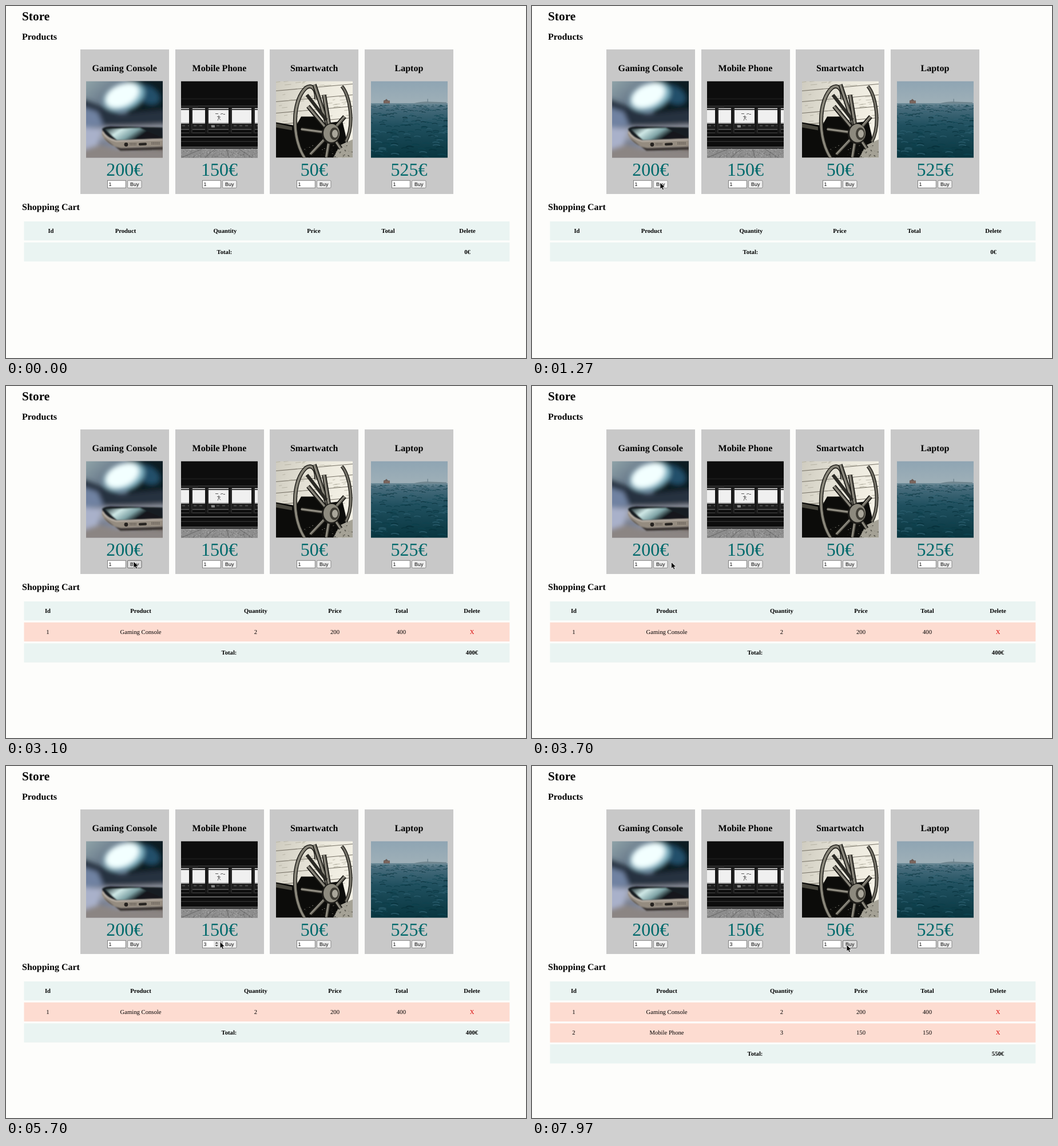
An HTML page for the animation above (8000 ms loop, 909 px wide and 616 px high).

```html
<!DOCTYPE html>
<html lang="en">
<head>
<meta charset="utf-8">
<title>Store</title>
<style>
html, body { margin: 0; width: 100%; height: 100%; overflow: hidden; background: #fdfdfb; }
#stage { display: block; width: 909px; height: 616px; }
text { font-family: "Liberation Serif", "Times New Roman", serif; text-rendering: geometricPrecision; }
.h1 { font-size: 21.33px; font-weight: bold; }
.h2 { font-size: 16px; font-weight: bold; }
.mid { text-anchor: middle; }
.price { font-size: 32px; fill: #006a6c; }
.ui { font-family: "Liberation Sans", Arial, sans-serif; font-size: 8.9px; }
.cell { font-size: 10.67px; text-anchor: middle; }
.head { font-weight: bold; }
.btn rect { fill: #efefef; stroke: #767676; stroke-width: .8; }
.btn.over rect { fill: #dedede; stroke: #4a4a4a; }
.btn.down rect { fill: #f5f5f5; stroke: #8d8d8d; }
</style>
</head>
<body>
<svg id="stage" viewBox="0 0 909 616">
  <defs>
    <filter id="b1" x="-30%" y="-30%" width="160%" height="160%"><feGaussianBlur stdDeviation=".8"/></filter>
    <filter id="b4" x="-60%" y="-60%" width="220%" height="220%"><feGaussianBlur stdDeviation="4.5"/></filter>
    <linearGradient id="desk" x2=".9" y2="1">
      <stop stop-color="#8fa3a8"/><stop offset=".4" stop-color="#53627a"/>
      <stop offset=".7" stop-color="#8d94a8"/><stop offset="1" stop-color="#6f6862"/>
    </linearGradient>
    <linearGradient id="glass" x2="1" y2=".3">
      <stop stop-color="#1c2a30"/><stop offset=".3" stop-color="#cfe8e6"/>
      <stop offset=".55" stop-color="#7fa3a6"/><stop offset=".75" stop-color="#12191d"/>
    </linearGradient>
    <linearGradient id="sky" x2="0" y2="1">
      <stop stop-color="#8fa5b3"/><stop offset="1" stop-color="#9fb0b8"/>
    </linearGradient>
    <linearGradient id="sea" x2="0" y2="1">
      <stop stop-color="#6f8c99"/><stop offset=".1" stop-color="#466b7b"/>
      <stop offset=".4" stop-color="#20505f"/><stop offset="1" stop-color="#07353f"/>
    </linearGradient>
    <linearGradient id="wall" x2="1" y2=".3">
      <stop stop-color="#cfccc0"/><stop offset=".6" stop-color="#ece9dd"/><stop offset="1" stop-color="#f4f1e6"/>
    </linearGradient>
  </defs>
  <text class="h1" x="28" y="25">Store</text>
  <text class="h2" x="28" y="59">Products</text>
  <g id="cards"></g>
  <text class="h2" x="28" y="357">Shopping Cart</text>
  <g id="cart"></g>
  <path id="cursor" d="M0 0V11.5L2.6 9.1L4.4 13.1L6.5 12.2L4.8 8.3H8.4Z" fill="#000" stroke="#fff" stroke-width=".8"/>
</svg>
<script>
const LOOP = 8000;
const $ = id => document.getElementById(id);
const products = [["Gaming Console", 200], ["Mobile Phone", 150], ["Smartwatch", 50], ["Laptop", 525]];
const cardX = i => 129.8 + 165.75 * i;

// Moments at which the state changes
const BUY_CONSOLE = 1350, BUY_AGAIN = 2350, STEP_UP = [4900, 5250], BUY_PHONE = 6250;
const PRESS = 120;

// Pointer stops: time, x, y
const stops = [[500, 300, 420], [1000, 224, 309], [2200, 224, 309], [2700, 223, 307], [3500, 223, 307],
  [4350, 368, 315], [4750, 367, 309], [5500, 367, 309], [6000, 387, 305], [6900, 387, 305], [7700, 550, 313]];

const rect = (x, y, w, h, fill, extra = "") =>
  `<rect x="${x}" y="${y}" width="${w}" height="${h}" fill="${fill}" ${extra}/>`;
const text = (cls, x, y, s, extra = "") => `<text class="${cls}" x="${x}" y="${y}" ${extra}>${s}</text>`;
const path = (d, fill, stroke = "none", width = 1, extra = "") =>
  `<path d="${d}" fill="${fill}" stroke="${stroke}" stroke-width="${width}" ${extra}/>`;
const repeat = (n, f) => Array.from({ length: n }, (_, i) => f(i)).join("");

function random(seed) {
  return () => (seed = (seed * 16807) % 2147483647) / 2147483647;
}

function phonePhoto() {
  return rect(0, 0, 134, 134, "url(#desk)") +
    `<g filter="url(#b4)">` +
    rect(72, -10, 80, 90, "#0f1a24") +
    path("M-10 30L30 45L60 58L140 50V82L-10 76Z", "#28333f") +
    path("M-10 44L20 54L30 78L-10 82Z", "#6f82a2") +
    `<ellipse cx="108" cy="24" rx="22" ry="14" fill="#24506b" transform="rotate(30 108 24)"/>` +
    `<ellipse cx="66" cy="27" rx="37" ry="23" fill="#7fb4c4" transform="rotate(-20 66 27)"/>` +
    `<ellipse cx="63" cy="25" rx="31" ry="19" fill="#f2ffff" transform="rotate(-25 63 25)"/>` +
    path("M-10 82L140 76V90L-10 110Z", "#9599a4") +
    path("M-10 100L50 118L140 120V145H-10Z", "#8b8583") +
    path("M-10 80L28 84L20 112L-10 122Z", "#a9b1ca") + "</g>" +
    `<g filter="url(#b1)">` +
    path("M28 84Q30 80 42 79L134 81V104L52 105Q32 98 28 84Z", "#161d21") +
    path("M33 84L94 82L134 99V102L54 103Z", "url(#glass)") +
    path("M28 86Q34 99 52 104L134 101V114L56 117Q32 108 28 93Z", "#958c80") +
    path("M29 89Q36 101 53 105L134 102", "none", "#d4cac0", 1.5) +
    path("M31 99Q44 115 62 117L134 115V120L60 122Z", "#3d3735") + "</g>" +
    `<circle cx="70" cy="111" r="3.4" fill="#25221f"/>` +
    rect(92, 108, 14, 4.5, "#282522", 'rx="2" transform="rotate(-3 99 110)"') +
    repeat(10, i => `<circle cx="${77 + (i % 5) * 2.5}" cy="${109 + (i > 4) * 2.5}" r=".7" fill="#3b3531"/>`) +
    repeat(12, i => `<circle cx="${115 + (i % 6) * 2.6}" cy="${107.5 + (i > 5) * 2.5}" r=".7" fill="#3b3531"/>`);
}

function stationPhoto() {
  const r = random(7);
  return rect(0, 0, 134, 134, "#0d0d0d") +
    rect(0, 30, 134, 2, "#1b1b1b") + rect(0, 43, 134, 1, "#555") +
    rect(0, 47, 134, 2, "#d8d8d8") + rect(0, 50.5, 134, 22, "#f0f0f0") +
    rect(0, 72.5, 134, 2, "#aaa") + rect(0, 74.5, 134, 11, "#1e1e1e") +
    repeat(14, i => rect(2 + i * 10, 77, 5, 2, "#4c4c4c")) +
    rect(0, 84, 134, 1, "#777") + rect(0, 90, 134, 1, "#555") +
    rect(0, 97, 134, 1.2, "#999") + rect(0, 105, 134, 1, "#444") +
    rect(0, 115, 134, 1.2, "#888") + rect(0, 118, 134, 16, "#8d8d8d") +
    repeat(230, () => rect((r() * 134).toFixed(1), (118 + r() * 16).toFixed(1), 1.6, .8, r() < .5 ? "#b5b5b5" : "#666")) +
    path("M0 134L38 118M42 134L60 118M84 134L80 118M125 134L100 118", "none", "#666") +
    path("M66 60v4l-2 5m2-5l3 4m-6-6l6 1M60 57h5M69 58l2-1h2l1 1h3", "none", "#333", .8) +
    rect(53, 77, 6, 4, "#888") +
    [14, 42, 83, 123].map(x => rect(x, 45, 6, 47, "#181818") + rect(x + 4.5, 47, .8, 44, "#444")).join("") +
    rect(0, 45, 134, 2, "#161616") + rect(0, 43, 30, 4, "#262626");
}

function wheelPhoto() {
  const r = random(23);
  const spokes = [[67, 6], [84, 24], [56, 44], [44, 84], [60, 128], [88, 133], [113, 118], [120, 62]];
  const rim = "M50 134C27 100 28 34 52 12C62 4 72 14 70 32", back = "M115 9C129 24 138 75 122 106";
  return rect(0, 0, 134, 134, "url(#wall)") +
    [17, 36, 56, 76].map(y => path(`M0 ${y}L134 ${y - 12}`, "none", "#777267", 1.1)).join("") +
    repeat(60, () => {
      const x = r() * 125, y = r() * 76;
      return path(`M${x.toFixed(1)} ${y.toFixed(1)}l${(4 + r() * 9).toFixed(1)} -1`, "none", "#aaa697", .7);
    }) +
    path("M0 72L35 78L44 62L66 62L84 74L116 70L124 104L108 134H0Z", "#0c0c0a") +
    path("M0 74L28 80V86L0 81Z", "#4a483f") +
    path("M112 112L134 102V134H100Z", "#a5a296") +
    repeat(60, () => rect((48 + r() * 86).toFixed(1), (112 + r() * 22).toFixed(1), 2, .8, r() < .5 ? "#8b887c" : "#24231e")) +
    path(rim, "none", "#1d1c18", 7) + path(rim, "none", "#8a877b", 4) +
    path(back, "none", "#24231e", 6) + path(back, "none", "#77746a", 3) +
    spokes.map(([x, y]) => path(`M95 91L${x} ${y}`, "none", "#1a1915", 7.5) +
      path(`M95 91L${x} ${y}`, "none", "#77746a", 4) + path(`M94 90L${x - 1} ${y}`, "none", "#b5b2a5", .9)).join("") +
    path("M54 24L88 68", "none", "#2b2a25", 6) +
    `<ellipse cx="96" cy="92" rx="16" ry="18" fill="#1f1e1a"/>` +
    `<ellipse cx="97" cy="91" rx="14" ry="16" fill="#8d8a7e"/>` +
    `<ellipse cx="102" cy="92" rx="8" ry="11" fill="#403e36"/>` +
    `<ellipse cx="103" cy="92" rx="5" ry="7" fill="#a9a69a"/>`;
}

function seaPhoto() {
  const r = random(41);
  return rect(0, 0, 134, 40, "url(#sky)") + rect(0, 38.5, 134, 96, "url(#sea)") +
    path("M74 39Q90 35 103 36L132 37V39Z", "#71868f") + rect(98.5, 31, 1.3, 6, "#6b818b") +
    path("M22 39V34L25 33L27 31L30 34H33V39Z", "#6b5d58") + rect(23, 36, 10, 1, "#9b7666") +
    repeat(260, () => {
      const d = r(), x = r() * 144 - 10, y = 42 + d * d * 91, w = 3 + d * 11;
      const color = ["#062f3a", "#0d4450", "#2f6273", "#0b3b47"][Math.floor(r() * 4)];
      return path(`M${x.toFixed(1)} ${y.toFixed(1)}q${(w / 2).toFixed(1)} ${(-1 - d * 2).toFixed(1)} ${w.toFixed(1)} .4`,
        "none", color, (.6 + d * 1.2).toFixed(1), 'opacity=".7"');
    });
}

const photos = [phonePhoto, stationPhoto, wheelPhoto, seaPhoto];

$("cards").innerHTML = products.map(([name, price], i) => {
  const x = cardX(i), left = Math.round(x), c = x + 77.4;
  return rect(left, 76, 155, 253, "#c8c8c8") + text("h2 mid", c, 114, name) +
    `<svg x="${Math.round(x + 10.6)}" y="131.5" width="134" height="134" viewBox="0 0 134 134">${photos[i]()}</svg>` +
    text("price mid", c, 297.3, price + "€") +
    rect(left + 47.5, 305.3, 31.8, 13, "#fff", 'stroke="#767676" stroke-width=".9"') +
    text("ui", left + 49.5, 315, 1, `id="qty${i}"`) +
    `<g id="btn${i}" class="btn">` + rect(left + 82.4, 305.3, 24.6, 13.2, "#efefef", 'rx="1.8"') +
    text("ui mid", left + 94.7, 315, "Buy") + "</g>" +
    `<g id="spin${i}">` + rect(left + 67, 306.5, 10.5, 10.6, "#e6e6e6") +
    path(`M${left + 69.5} 310.7l2.7 -2.8l2.7 2.8zM${left + 69.5} 312.9l2.7 2.8l2.7 -2.8z`, "#4c4c4c") + "</g>";
}).join("");

function drawCart(items) {
  const cols = items.length ? [73, 235.5, 436.5, 575, 691, 814.5] : [78.5, 209, 383, 538, 668, 806.5];
  let y = 377, out = "";
  const row = (fill, cls, cells) => {
    out += rect(31.5, y, 848.8, 33.4, fill);
    for (const [x, s, color = "#000"] of cells) out += text("cell " + cls, x, y + 20, s, `fill="${color}"`);
    y += 36.7;
  };
  const mint = "#eaf4f2";
  row(mint, "head", ["Id", "Product", "Quantity", "Price", "Total", "Delete"].map((s, i) => [cols[i], s]));
  items.forEach(([p, n, total], k) => row("#fddcd1", "",
    [k + 1, products[p][0], n, products[p][1], total].map((s, i) => [cols[i], s]).concat([[cols[5], "X", "#d80000"]])));
  const sum = items.reduce((a, item) => a + item[2], 0);
  row(mint, "head", [[items.length ? 390 : 382, "Total:"], [cols[5], sum + "€"]]);
  $("cart").innerHTML = out;
}

function pointer(t) {
  const k = stops.findIndex(s => s[0] > t);
  if (k < 0) return stops[stops.length - 1].slice(1);
  if (k === 0) return null;
  const [t0, x0, y0] = stops[k - 1], [t1, x1, y1] = stops[k];
  const u = (t - t0) / (t1 - t0), e = u * u * (3 - 2 * u);
  return [x0 + (x1 - x0) * e, y0 + (y1 - y0) * e];
}

let shown = "";
function render(t) {
  const items = [];
  if (t >= BUY_CONSOLE) items.push(t < BUY_AGAIN ? [0, 1, 200] : [0, 2, 400]);
  if (t >= BUY_PHONE) items.push([1, 3, 150]);
  const key = JSON.stringify(items);
  if (key !== shown) {
    drawCart(items);
    shown = key;
  }
  $("qty1").textContent = 1 + STEP_UP.filter(s => t >= s).length;

  const p = pointer(t);
  const pressed = [BUY_CONSOLE, BUY_AGAIN, BUY_PHONE].some(b => t >= b - PRESS && t < b);
  $("cursor").style.display = p ? "" : "none";
  if (p) $("cursor").setAttribute("transform", `translate(${p[0]} ${p[1]})`);
  products.forEach((_, i) => {
    const dx = p ? p[0] - Math.round(cardX(i)) : -1;
    const inRow = !!p && p[1] >= 304.5 && p[1] <= 319;
    const over = inRow && dx > 82 && dx < 107;
    $("btn" + i).classList.toggle("over", over);
    $("btn" + i).classList.toggle("down", over && pressed);
    $("spin" + i).style.display = inRow && dx > 47 && dx < 80 ? "" : "none";
  });
}

const start = performance.now();
function tick() {
  render((performance.now() - start) % LOOP);
  requestAnimationFrame(tick);
}
tick();
</script>
</body>
</html>
```
